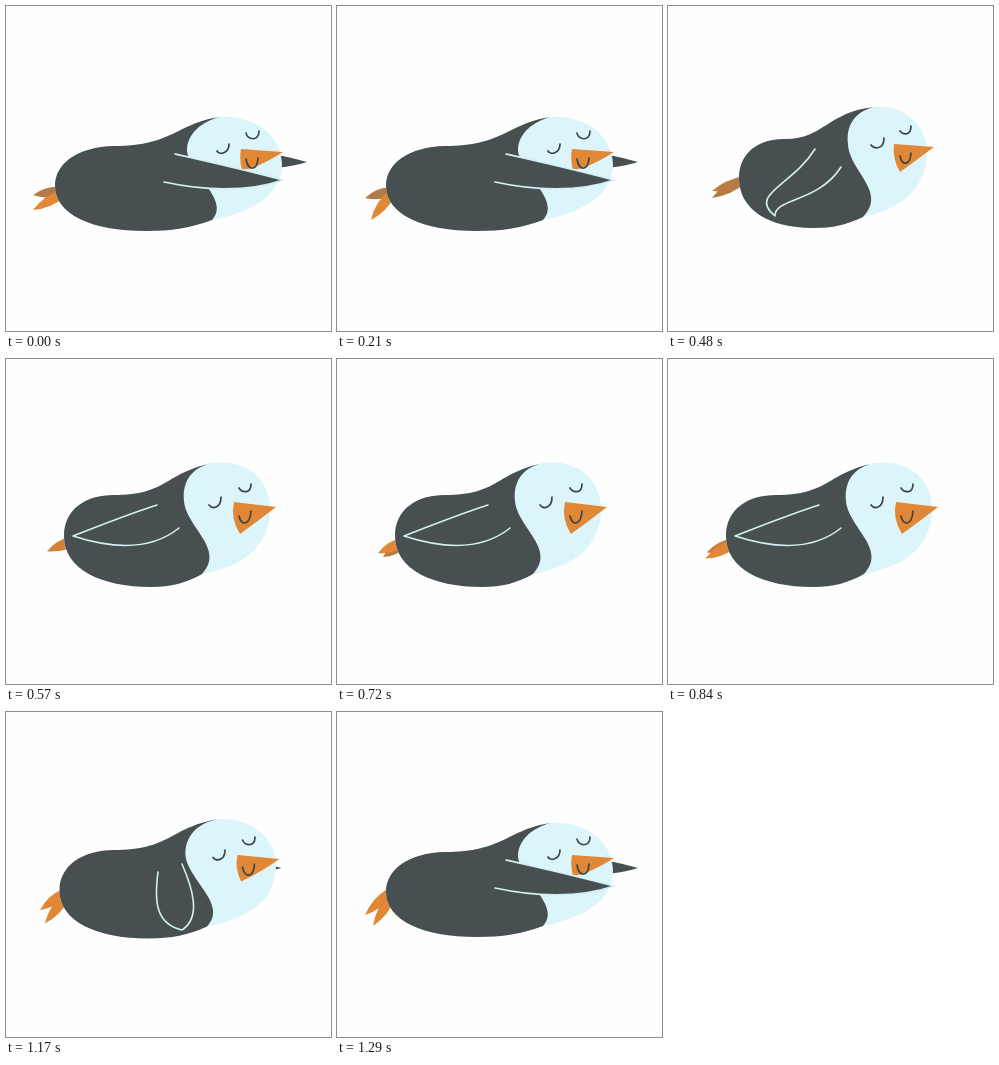
These frames come from a looping animation (325x325 px, 1350 ms). An HTML page:

```html
<!DOCTYPE html>
<html lang="en">
<head>
<meta charset="utf-8">
<title>Swimming penguin</title>
<style>
  html, body { margin: 0; width: 100%; height: 100%; overflow: hidden; background: #fefefe; }
  svg { display: block; width: 100vw; height: 100vh; }
  .line { fill: none; stroke: #3d4445; stroke-width: 1.7; stroke-linecap: round; }
</style>
</head>
<body>
<svg viewBox="0 0 325 325">
  <path id="farWing" fill="#474f50"/>
  <path id="farFoot"/>
  <path id="nearFoot"/>
  <path id="skin" fill="#dcf5fb"/>
  <path id="coat" fill="#474f50"/>
  <path id="eyes" class="line"/>
  <path id="beak" fill="#e18836"/>
  <path id="smile" class="line"/>
  <path id="wing" fill="#474f50" stroke="#d3f0f4" stroke-width="1.6" stroke-linecap="round" stroke-linejoin="round"/>
</svg>
<script>
const LOOP = 1350, STEP = 30, LAST = 1290;

const reach = {
  head: 'M213 111C247 109 275 128 276 158C276 186 250 206 206 214',
  back: 'C185 222 165 225 140 225C85 225 49 208 49 180C49 157 72 141 108 140C166 140 170 118 213 111Z',
  chest: 'M213 111C196 116 181 127 181 145C184 168 225 195 206 214',
  eyes: 'M211 145C213 149 223 148 223 138M240 127C241 134 253 136 253 125',
  beak: 'M235 143L277 146Q252 162 236 164Q233 153 235 143Z',
  smile: 'M240 153C242 165 251 166 252 152',
  farWing: 'M240 146Q275 148 301 156Q278 163 240 164Z'
};
const pull = {
  head: 'M213 96C245 94 267 113 267 139C267 170 247 195 200 207',
  back: 'C186 212 170 214 148 214C95 214 65 195 65 165C65 142 85 127 115 127C160 127 165 102 213 96Z',
  chest: 'M213 96C194 102 182 112 183 133C186 158 224 184 200 207',
  eyes: 'M208 131C211 135 219 136 219 125M234 116C237 120 246 121 246 111',
  beak: 'M231 129L268 133Q252 146 236 159Q227 144 231 129Z',
  smile: 'M235 142C237 153 245 153 245 139',
  farWing: 'M200 146Q225 148 250 156Q228 163 200 164Z'
};
const push = {
  head: 'M206 101C238 98 259 120 259 147C259 180 235 203 195 211',
  back: 'C178 219 165 222 145 222C100 222 71 203 71 172C71 146 92 132 118 133C155 133 160 106 206 101Z',
  chest: 'M206 101C186 106 178 120 180 138C181 165 220 186 195 211',
  eyes: 'M203 139C206 143 216 144 216 132M232 125C235 129 243 130 243 120',
  beak: 'M226 138L266 141Q250 153 232 166Q224 152 226 138Z',
  smile: 'M232 150C234 160 242 160 243 147',
  farWing: pull.farWing
};
const glide = {
  head: 'M207 104C240 100 264 120 264 150C264 185 240 207 196 215',
  back: 'C180 224 165 228 145 228C95 228 58 210 58 177C58 150 80 136 108 136C162 136 158 114 207 104Z',
  chest: 'M207 104C186 108 176 122 178 142C180 168 220 190 196 215',
  eyes: 'M203 146C206 150 215 150 215 138M233 129C236 134 245 135 245 125',
  beak: 'M228 143L270 148Q252 162 234 175Q224 159 228 143Z',
  smile: 'M233 157C235 167 244 167 245 152',
  farWing: pull.farWing
};

const wings = {
  front: 'M169 148C200 155 240 164 277 174C240 187 195 184 158 176',
  bent: 'M175 142C198 157 222 171 256 177C240 198 203 193 164 170',
  down: 'M176 152C186 175 196 205 176 218C150 212 148 190 152 160',
  swept: 'M173 161C150 197 106 192 107 210C80 188 124 180 147 143',
  folded: 'M173 169C147 190 110 191 67 177C95 166 123 155 151 146'
};

const lin = q => q, easeIn = q => q * q, easeOut = q => q * (2 - q);
const smooth = q => q * q * (3 - 2 * q);

// [time, value, easing towards the next key]
const bodyKeys = [
  [0, reach, lin], [225, reach, smooth], [360, pull, lin], [480, push, easeOut],
  [540, glide, lin], [1080, glide, smooth], [1260, reach, lin]
];
const wingKeys = [
  [0, wings.front, lin], [225, wings.front, smooth], [360, wings.bent, lin],
  [420, wings.down, lin], [480, wings.swept, easeOut], [540, wings.folded, lin],
  [1080, wings.folded, easeIn], [1170, wings.down, easeOut], [1260, wings.front, lin]
];

// ankle x, ankle y, toe x, toe y, shade
const nearKeys = [
  [0, [56, 188, 27, 204, 0]], [105, [55, 188, 26, 208, 0]], [210, [54, 188, 34, 214, 0]],
  [360, [74, 168, 43, 196, 0]], [480, [76, 173, 44, 192, .9]], [540, [67, 181, 41, 192, .4]],
  [720, [66, 183, 41, 194, 0]], [850, [66, 185, 37, 200, 0]], [990, [66, 188, 43, 208, 0]],
  [1290, [55, 184, 36, 214, 0]]
];
const farKeys = [
  [0, [56, 185, 27, 189, 1]], [105, [55, 185, 25, 192, 1]], [210, [54, 185, 28, 192, 1]],
  [360, [75, 170, 45, 197, .9]], [480, [76, 175, 44, 185, .8]], [540, [67, 182, 42, 190, .9]],
  [720, [66, 185, 46, 198, .9]], [850, [66, 183, 38, 193, .5]], [990, [66, 182, 43, 191, 0]],
  [1290, [53, 180, 28, 203, 0]]
];

const mix = (a, b, q) => a + (b - a) * q;

function mixPath(a, b, q) {
  const ends = b.match(/\d+/g);
  let i = 0;
  return a.replace(/\d+/g, n => mix(+n, +ends[i++], q).toFixed(2));
}

function at(keys, t) {
  let i = keys.length - 1;
  while (keys[i][0] > t) i--;
  const a = keys[i], b = keys[i + 1] || a;
  const q = a === b ? 0 : (t - a[0]) / (b[0] - a[0]);
  return [a[1], b[1], (a[2] || lin)(q)];
}

const el = id => document.getElementById(id);
const setPath = (id, d) => el(id).setAttribute('d', d);

function drawFoot(id, keys, t) {
  const [a, b, q] = at(keys, t);
  const [ax, ay, tx, ty, shade] = a.map((v, i) => mix(v, b[i], q));
  const len = Math.hypot(tx - ax, ty - ay);
  const nx = (ay - ty) / len, ny = (tx - ax) / len;
  const mx = (ax + tx) / 2, my = (ay + ty) / 2;
  const p = (x, y, w) => `${(x + nx * w).toFixed(2)} ${(y + ny * w).toFixed(2)}`;
  setPath(id, `M${p(ax, ay, 4)}Q${p(mx, my, 7.5)} ${p(tx, ty, 0)}Q${p(mx, my, -7.5)} ${p(ax, ay, -4)}Z`);
  const rgb = [mix(225, 178, shade), mix(136, 122, shade), mix(54, 70, shade)].map(Math.round);
  el(id).setAttribute('fill', `rgb(${rgb})`);
}

function draw(t) {
  const [a, b, q] = at(bodyKeys, t);
  const part = name => mixPath(a[name], b[name], q);
  const back = part('back');
  setPath('skin', part('head') + back);
  setPath('coat', part('chest') + back);
  ['eyes', 'beak', 'smile', 'farWing'].forEach(name => setPath(name, part(name)));
  setPath('wing', mixPath(...at(wingKeys, t)));
  drawFoot('farFoot', farKeys, t);
  drawFoot('nearFoot', nearKeys, t);
}

let start = null;
function tick(now) {
  if (start === null) start = now;
  const t = (now - start) % LOOP;
  draw(Math.min(LAST, Math.floor(t / STEP) * STEP));
  requestAnimationFrame(tick);
}
draw(0);
requestAnimationFrame(tick);
</script>
</body>
</html>
```
